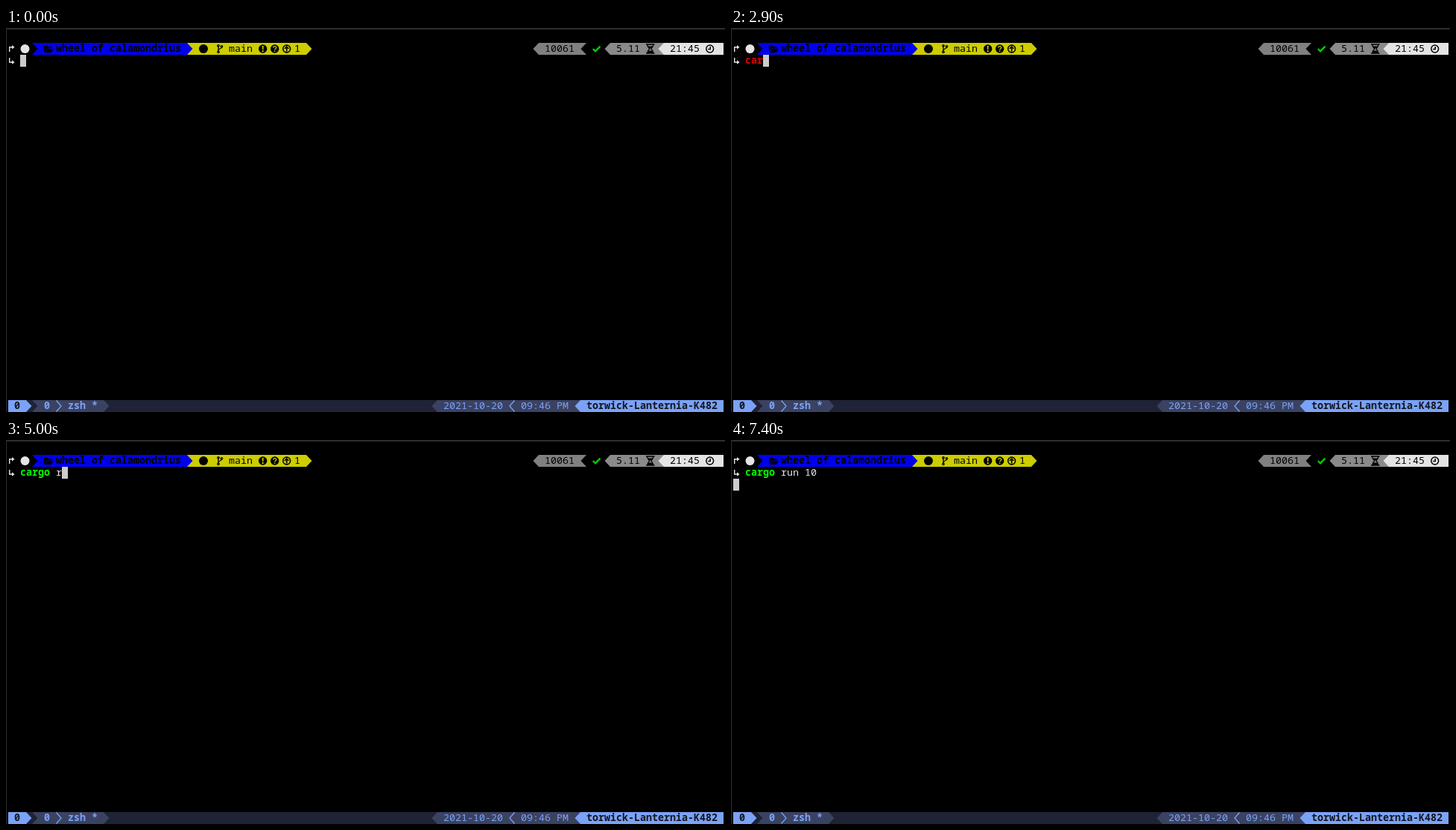
These frames come from a looping animation (965 px wide and 516 px high, 8000 ms). An HTML page:

```html
<!DOCTYPE html>
<html lang="en">
<head>
<meta charset="utf-8">
<title>Terminal</title>
<style>
  html, body { margin: 0; width: 100%; height: 100%; overflow: hidden; background: #000; }
  svg { display: block; }
  text { font: 13.3333px "Noto Sans Mono", "DejaVu Sans Mono", monospace; white-space: pre; }
  .bold { font-weight: 700; }
  .line { fill: none; stroke-width: 1.3; }
</style>
</head>
<body>
<svg width="965" height="516" viewBox="0 0 965 516">
  <defs>
    <path id="right" d="M0 0l7.5 8-7.5 8z"/>
    <path id="left" d="M8 0L.5 8 8 16z"/>
  </defs>

  <!-- window edge -->
  <path fill="#2d2d2d" d="M0 0h965v2H0zM0 2h1v514H0z"/>

  <!-- prompt, left side -->
  <g fill="#e5e5e5">
    <path d="M4 25h4v-2l3.5 2.7L8 28.4v-2H5.4V32H4z"/>
    <path d="M4 40h1.4v5.3H8v-2l3.5 2.7L8 48.7v-2H4z"/>
    <circle cx="25.5" cy="28" r="6"/>
  </g>
  <path fill="#0000ee" d="M35 20h208v16H35z"/>
  <path fill="#cdcd00" d="M243 20h160v16H243z"/>
  <use href="#right" x="35" y="20"/>
  <use href="#right" x="243" y="20" fill="#0000ee"/>
  <use href="#right" x="403" y="20" fill="#cdcd00"/>
  <path d="M51 32v-7.5l1-1h3.5l1.3 1.5H61l.8 1v1.5H55l-3.6 5zM52 33l3.3-4.8H64L60.8 33z"/>
  <text class="bold" x="67" y="32">wheel of calamondrius</text>
  <circle cx="265" cy="28" r="6"/>
  <g class="line" stroke="#000">
    <path d="M285 24.5v7M289.5 25.5c0 3-4.500 2-4.500 4.500"/>
    <circle cx="285" cy="23.800" r="1.200"/>
    <circle cx="285" cy="32.200" r="1.200"/>
    <circle cx="289.500" cy="24.800" r="1.200"/>
  </g>
  <text x="299" y="32">main</text>
  <circle cx="344.700" cy="28" r="5.700"/>
  <circle cx="360.700" cy="28" r="5.700"/>
  <path fill="#cdcd00" d="M343.700 24h2l-.3 5h-1.400zM343.700 30h2v2h-2z"/>
  <path class="line" stroke="#cdcd00" stroke-width="1.500" d="M358.700 26.500c0-2.500 4-2.500 4 0 0 1.500-2 1.500-2 3M360.700 30.500v1.500"/>
  <g class="line" stroke="#000" style="stroke-width:1.600">
    <circle cx="376.700" cy="28" r="4.900"/>
    <path d="M376.700 31.500v-6M374 27.800l2.700-2.700 2.700 2.700"/>
  </g>
  <text x="387" y="32">1</text>

  <!-- prompt, right side -->
  <path fill="#808080" d="M715 20h64v16h-64z"/>
  <path fill="#8a8a8a" d="M811 20h72v16h-72z"/>
  <path fill="#e4e4e4" d="M883 20h80v16h-80z"/>
  <use href="#left" x="707" y="20" fill="#808080"/>
  <use href="#left" x="771" y="20"/>
  <use href="#left" x="803" y="20" fill="#8a8a8a"/>
  <use href="#left" x="875" y="20" fill="#e4e4e4"/>
  <text x="723" y="32">10061</text>
  <path fill="none" stroke="#00cd00" stroke-width="2.400" d="M787.800 28l3.200 3.200 6.500-6.500"/>
  <text x="819" y="32">5.11</text>
  <path class="line" stroke="#000" d="M859 22h11.500M859 34h11.500M860.700 22c0 4 2.800 4.500 2.800 6s-2.800 2-2.800 6M868.800 22c0 4-2.800 4.500-2.800 6s2.800 2 2.800 6"/>
  <path d="M861.500 24.500h6.500l-2.500 3h-1.500zM861 33.500c.5-3 2-3 3.700-3s3.200 0 3.700 3z"/>
  <text x="891" y="32">21:45</text>
  <g class="line" stroke="#000" style="stroke-width:1.500">
    <circle cx="944.700" cy="28" r="4.900"/>
    <path d="M945.200 25v3.500h-3"/>
  </g>

  <!-- command line -->
  <text y="48" fill="#e5e5e5"><tspan id="command" class="bold" x="19"></tspan><tspan id="rest" x="59"></tspan></text>
  <rect id="cursor" width="8" height="16" fill="#ccc"/>

  <!-- status bar -->
  <g transform="translate(0 500)">
    <path fill="#1f2335" d="M3 0h960v16H3z"/>
    <path fill="#3b4261" d="M35 0h96v16H35zM579 0h192v16H579z"/>
    <path fill="#7aa2f7" d="M3 0h24v16H3zM771 0h192v16H771z"/>
    <use href="#right" x="27" fill="#7aa2f7"/>
    <use href="#right" x="35" fill="#1f2335"/>
    <use href="#right" x="131" fill="#3b4261"/>
    <use href="#left" x="571" fill="#3b4261"/>
    <use href="#left" x="763" fill="#7aa2f7"/>
    <path class="line" stroke="#7aa2f7" d="M67.500.5l6.500 7.500-6.500 7.500M682.500.5L676 8l6.500 7.500"/>
    <g class="bold" fill="#15161e">
      <text class="bold" x="11" y="12">0</text>
      <text class="bold" x="779" y="12">torwick-Lanternia-K482</text>
    </g>
    <g fill="#7aa2f7">
      <text class="bold" x="51" y="12">0</text>
      <text class="bold" x="83" y="12">zsh *</text>
      <text x="587" y="12">2021-10-20</text>
      <text x="691" y="12">09:46 PM</text>
    </g>
  </g>
</svg>
<script>
  const LOOP = 8000, ENTER = 7400;
  const line = "cargo run 10";
  const keyTimes = [1500, 1900, 2900, 3800, 4200, 4400, 5000, 5100, 5500, 5700, 6300, 6600];
  const [command, rest, cursor] = ["command", "rest", "cursor"].map(id => document.getElementById(id));
  const start = performance.now();

  function draw() {
    const t = (performance.now() - start) % LOOP;
    const typed = keyTimes.filter(k => k <= t).length;
    const entered = t >= ENTER;
    command.textContent = line.slice(0, Math.min(typed, 5));
    rest.textContent = line.slice(5, Math.max(typed, 5));
    // a complete, known command turns green
    command.setAttribute("fill", typed < 5 ? "#dd0000" : "#00ff00");
    cursor.setAttribute("x", entered ? 3 : 19 + 8 * typed);
    cursor.setAttribute("y", entered ? 52 : 36);
    requestAnimationFrame(draw);
  }
  draw();
</script>
</body>
</html>
```
